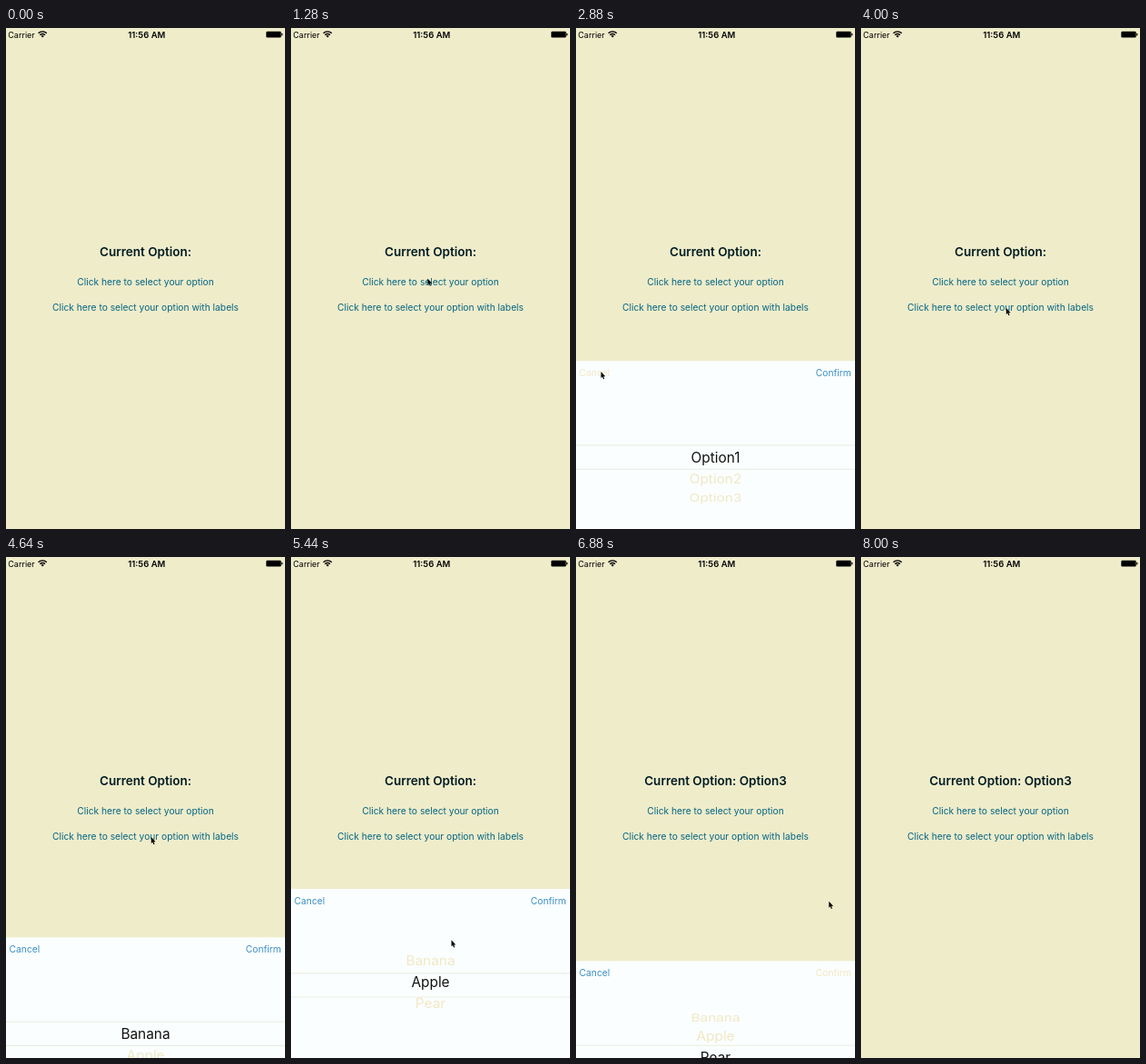
Write an HTML page that moves like this. It is 307x551 px and loops after 8480 ms.

```html
<!DOCTYPE html>
<html lang="en">
<head>
<meta charset="utf-8">
<title>Option picker</title>
<style>
  html, body { margin: 0; width: 100%; height: 100%; overflow: hidden; background: #efecca; }
  svg { display: block; width: 307px; height: 551px; font: 10.25px Inter, Roboto, sans-serif; }
  .mid { text-anchor: middle; }
  .status { font-size: 9px; }
  .clock { font-size: 9.5px; font-weight: 600; }
  .title { font-size: 13.5px; font-weight: 600; fill: #001c22; }
  .link { fill: #046583; }
  .button { fill: #3a8fc8; }
  .button.pressed, .row { fill: #f0e8c4; }
  .row { font-size: 15.4px; }
  .row.chosen { fill: #111; }
</style>
</head>
<body>
<svg viewBox="0 0 307 551">
  <rect width="307" height="551" fill="#efecca"/>
  <g class="status">
    <text x="2.3" y="10.6">Carrier</text>
    <text x="154.8" y="10.7" class="mid clock">11:56 AM</text>
    <path d="M35.6 5.8a6.4 6.4 0 0 1 9.2 0M37.4 7.7a3.9 3.9 0 0 1 5.6 0" fill="none" stroke="#000" stroke-width="1.4"/>
    <path d="M38.6 8.9a2.2 2.2 0 0 1 3.2 0L40.2 10.5z"/>
    <rect x="286.3" y="3.8" width="16.4" height="6.6" rx="1.2"/>
    <rect x="303.2" y="5.8" width="1.1" height="2.6" rx=".5"/>
  </g>
  <text id="title" x="153.5" y="250.8" class="mid title"></text>
  <text x="153.5" y="282.8" class="mid link">Click here to select your option</text>
  <text x="153.5" y="310.8" class="mid link">Click here to select your option with labels</text>
  <g id="sheet">
    <rect width="307" height="190" fill="#fbfefe"/>
    <text id="cancel" x="3.6" y="16.7" class="button">Cancel</text>
    <text id="confirm" x="302.8" y="16.7" class="button" text-anchor="end">Confirm</text>
    <path d="M0 92.8H307M0 119H307" stroke="#e6e6d6" stroke-width=".8"/>
    <text class="mid row"></text>
    <text class="mid row"></text>
    <text class="mid row"></text>
  </g>
  <path id="cursor" d="M0 0V7L1.5 5.6 2.6 8.2 3.7 7.7 2.7 5.2H4.8Z"/>
</svg>
<script>
const LOOP = 8480, STEP = 160;
const STAGE_HEIGHT = 551, SHEET_HEIGHT = 186;
const WHEEL = { x: 153.5, y: 106.2, radius: 66.7, angle: 0.36 };

const visits = [
  { open: 1440, close: 2845, labels: ["Option1", "Option2", "Option3"] },
  { open: 4480, close: 6737, labels: ["Banana", "Apple", "Pear"] }
];

const entry = { x: 169, y: 382 };
const moves = [
  { start: 320, time: 960, x: 150.3, y: 275.5 },   // first link
  { start: 1920, time: 640, x: 27.5, y: 378 },     // Cancel
  { start: 3200, time: 800, x: 159.8, y: 308 },    // second link
  { start: 4800, time: 320, x: 176.5, y: 450 },    // wheel
  { start: 5120, time: 400, x: 176.5, y: 418 },    // drag up
  { start: 5680, time: 880, x: 278.3, y: 378.7 },  // Confirm
  { start: 7520, time: 320, x: 154.5, y: 485 }     // leave
];

const byId = id => document.getElementById(id);
const rows = [...document.querySelectorAll(".row")];
const progress = (t, start, time) => Math.min(1, Math.max(0, (t - start) / time));
const easeIn = p => p ** 3;
const easeOut = (p, power) => 1 - (1 - p) ** power;
const smooth = p => p * p * (3 - 2 * p);
const move = (el, x, y, extra = "") => el.setAttribute("transform", `translate(${x} ${y})${extra}`);

function drawSheet(t, { open, close, labels }) {
  const shown = easeOut(progress(t, open, 470), 3) - easeIn(progress(t, close, 190));
  move(byId("sheet"), 0, STAGE_HEIGHT - SHEET_HEIGHT * shown);
  const scroll = 2 * easeOut(progress(t, 5120, 900), 2);
  rows.forEach((row, i) => {
    const angle = (i - scroll) * WHEEL.angle;
    row.textContent = labels[i];
    row.classList.toggle("chosen", i === Math.round(scroll));
    move(row, WHEEL.x, WHEEL.y + WHEEL.radius * Math.sin(angle),
      ` scale(1 ${Math.cos(angle)}) translate(0 5.6)`);
  });
}

function drawCursor(t) {
  let { x, y } = entry;
  for (const m of moves) {
    const p = smooth(progress(t, m.start, m.time));
    x += (m.x - x) * p;
    y += (m.y - y) * p;
  }
  move(byId("cursor"), x, y);
  byId("cursor").style.display = t >= 320 && t < 8000 ? "" : "none";
}

function draw(t) {
  const confirmed = t > visits[1].close;
  byId("title").textContent = "Current Option:" + (confirmed ? " Option3" : "");
  byId("cancel").classList.toggle("pressed", t >= 2720 && t < visits[1].open);
  byId("confirm").classList.toggle("pressed", confirmed);
  drawSheet(t, t < visits[1].open ? visits[0] : visits[1]);
  drawCursor(t);
}

function tick() {
  const t = performance.now() % LOOP;
  draw(Math.floor(t / STEP) * STEP);
  requestAnimationFrame(tick);
}
tick();
</script>
</body>
</html>
```
